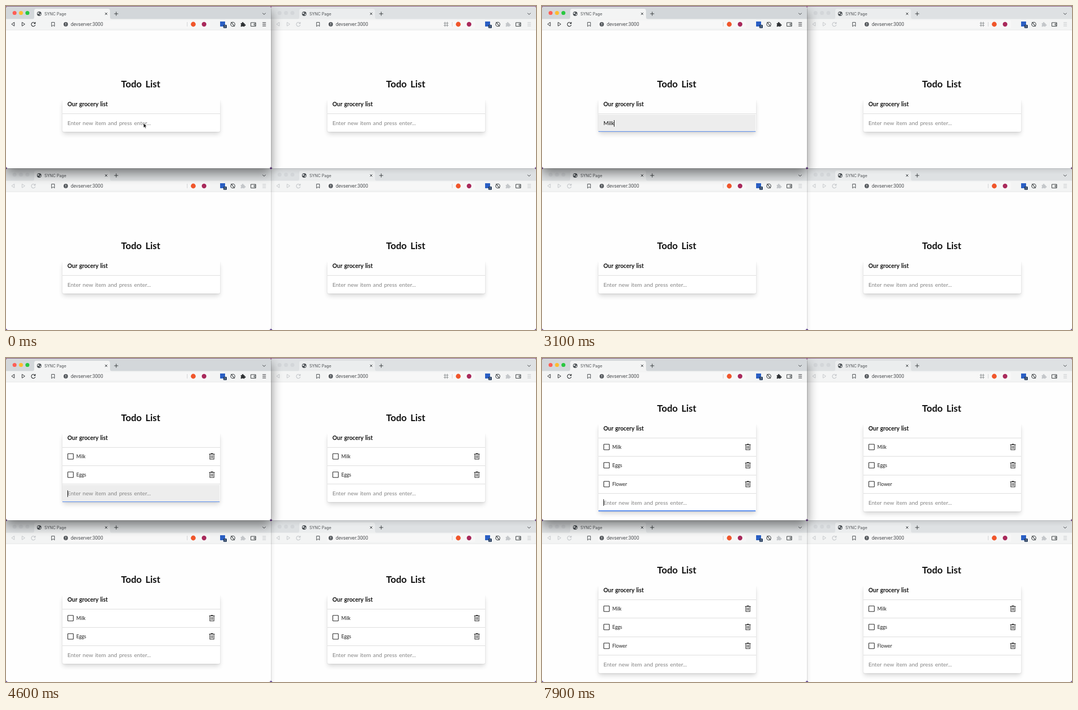
These frames come from a looping animation (958x585 px, 8000 ms). An HTML page:

```html
<!DOCTYPE html>
<html lang="en">
<head>
<meta charset="utf-8">
<title>Shared list</title>
<style>
  html, body { margin: 0; width: 100%; height: 100%; overflow: hidden; }
  body {
    position: relative;
    background: linear-gradient(#a5749f, #5b2380 50%, #43178c);
    font-family: Lato, sans-serif;
    color: #111;
  }
  .win {
    position: absolute; width: 479px; height: 292px;
    border-radius: 4px; overflow: hidden; background: #fefefe;
    box-shadow: 0 0 0 .5px rgba(0,0,0,.2), 0 3px 10px rgba(0,0,0,.12);
  }
  .win.active {
    z-index: 2;
    box-shadow: 0 0 0 .5px rgba(0,0,0,.3), 0 9px 20px rgba(0,0,0,.48);
  }
  .page { position: absolute; left: 0; top: -1px; width: 479px; height: 293px; }
  .page > svg { position: absolute; left: 0; top: 0; }
  h1 {
    position: absolute; left: 208px; top: 129px; margin: 0;
    font: 700 17px/24px Lato, sans-serif; word-spacing: 2.5px; white-space: nowrap;
  }
  .card { position: absolute; left: 102px; top: 160px; width: 285px; }
  /* the sides only become visible below the top of the heading */
  .card::before {
    content: ""; position: absolute; inset: 9px 0 0; border-radius: 3px;
    background: #fff;
    box-shadow: 0 5px 8px -1px rgba(10,10,10,.16), 0 1px 0 1px rgba(10,10,10,.03);
  }
  .head, .item, .entry { position: relative; box-sizing: border-box; padding-left: 9px; white-space: nowrap; }
  .head { height: 34px; font: 700 10.4px/34px Lato, sans-serif; word-spacing: .8px; background: #fefefe; }
  .item { height: 33.2px; padding-left: 25px; font-size: 8.8px; line-height: 32px; color: #222; }
  .item, .entry { border-top: 1px solid #dedede; }
  .item svg { position: absolute; left: 0; top: 0; }
  .entry { height: 33px; font-size: 10.2px; line-height: 33px; word-spacing: 1px; }
  .entry > * { position: relative; }
  .entry .fill { position: absolute; left: 0; right: 1px; top: 1px; bottom: 1px; background: #ededed; opacity: 0; }
  .entry .line { position: absolute; left: 0; right: 1px; bottom: 0; height: 1.5px; background: #5c8fee; opacity: 0; }
  .hint { color: #858585; }
  .caret { display: inline-block; width: 1px; height: 12px; margin-right: -1px; vertical-align: -2.5px; background: #222; visibility: hidden; }
  .pointer { position: absolute; left: 0; top: 0; z-index: 3; }
</style>
</head>
<body>
<svg class="pointer" width="479" height="292">
  <path id="arrow" d="M248.6 211.6v8.2l1.9-1.7 1.3 2.9 1.4-.6-1.3-2.8h2.6z" fill="#111" stroke="#fff" stroke-width=".6"/>
  <path id="beam" d="M246.6 208.4q1.7 0 1.9 1v6.4q-.2 1-1.9 1M250.4 208.4q-1.7 0-1.9 1v6.4q.2 1 1.9 1M247.3 213.4h2.4" fill="none" stroke="#222" stroke-width=".9"/>
</svg>
<script>
const LOOP = 8000, SHIFT = 16.6;
const GROCERIES = ['Milk', 'Eggs', 'Flower'];
const ADDED = [3300, 4500, 7800];
// [time, text in the entry field]
const TYPING = [
  [0, ''], [2400, 'M'], [2800, 'Mi'], [2900, 'Mil'], [3100, 'Milk'], [3300, ''],
  [3500, 'E'], [3900, 'Eg'], [4100, 'Egg'], [4300, 'Eggs'], [4500, ''],
  [6700, 'F'], [7200, 'Fl'], [7300, 'Flo'], [7400, 'Flow'], [7500, 'Flowe'], [7600, 'Flower'], [7800, '']
];
const CARET_OFF = [[0, 300], [1200, 2200], [5500, 6100]];

const stroke = (d, color, width = 1) =>
  `<path d="${d}" fill="none" stroke="${color}" stroke-width="${width}" stroke-linecap="round" stroke-linejoin="round"/>`;

function toolbar(active, extra) {
  const ink = '#3c4043', dim = active ? '#2e3134' : '#c4c7ca';
  const lights = active ? ['#ff5f57', '#febc2e', '#28c840'] : Array(3).fill('#d3d6d9');
  return `<svg width="479" height="44">
    <rect width="479" height="24" fill="${active ? '#d3d7da' : '#dee1e3'}"/>
    <path d="M47 24q4 0 4-4V9q0-4 4-4h129q4 0 4 4v11q0 4 4 4z" fill="${active ? '#f3f4f4' : '#ebedee'}"/>
    <rect y="23.5" width="479" height="20" fill="#f3f4f4"/>
    <rect x="101" y="26" width="268" height="14" rx="3" fill="#f7f7f7"/>
    <path d="M0 43.3h479" stroke="#e2e3e4" stroke-width=".7"/>
    ${lights.map((c, i) => `<circle cx="${15.5 + i * 11.6}" cy="12.5" r="3.6" fill="${c}"/>`).join('')}
    <circle cx="60" cy="14" r="4" fill="#4b5054"/>
    <path d="M57 12.2l2.4-.8 1 1.4-1.6 1.8-1.8-.6zM61 14.2l2.2-.4-.8 2.4-1.6.6z" fill="#e8eaeb"/>
    <text x="69.5" y="16.6" font-family="Inter, sans-serif" font-size="7.2" fill="#4a4d50">SYNC Page</text>
    ${stroke('M179.2 12.2l3.6 3.6m0-3.6l-3.6 3.6M196 14h6.4m-3.2-3.2v6.4', ink)}
    ${stroke('M464 13l2.5 2.4 2.5-2.4', ink)}
    ${stroke('M15 29.8v6.4L10.4 33zM29 29.8v6.4l4.8-3.2z', dim)}
    ${stroke('M52.2 30.8a3.6 3.6 0 1 0 .6 3.6M53 29.4v2.2h-2.4', dim, 1.1)}
    ${stroke('M82.7 29.5h5v7.2l-2.5-2-2.5 2z', ink, .9)}
    <circle cx="108" cy="33" r="3.9" fill="#54585c"/>
    <path d="M108 30.6v2.9m0 1v1" stroke="#fff"/>
    <text x="117" y="36" font-family="Roboto, sans-serif" font-size="8.6" fill="#4a4d50">devserver:3000</text>
    ${extra ? stroke('M314.5 29v8m4-8v8M312.5 31h8m-8 4h8', '#85898c', .9) : ''}
    <path d="M327.5 29v8" stroke="#d2d4d6"/>
    <circle cx="338.5" cy="33" r="4.4" fill="#f0562b"/>
    <circle cx="358" cy="33" r="4.2" fill="#a92a5c"/>
    <rect x="387" y="28" width="9" height="9" fill="#2a5fc4"/>
    <rect x="393" y="34" width="6" height="6" rx="1" fill="#1d3557"/>
    <text x="394.6" y="38.8" font-family="Roboto, sans-serif" font-size="5" fill="#fff">2</text>
    <circle cx="410" cy="33" r="3.8" fill="none" stroke="${ink}" stroke-width="1.1"/>
    ${stroke('M407 29.4l6 7.2', ink, 1.1)}
    <path d="M424.4 31h2.2a1.4 1.4 0 1 1 2.6 0h2v2.2a1.4 1.4 0 1 1 0 2.4v1.6h-2.2a1.4 1.4 0 0 0-2.4 0h-2.2v-2.2a1.3 1.3 0 0 0 0-2.2z" fill="${dim}"/>
    ${stroke('M443 30h8.4v6.6H443zM451.4 32h-3v2.6h3', ink)}
    ${stroke('M464 30h5.4m-5.4 3h5.4m-5.4 3h5.4', dim, 1.1)}
  </svg>`;
}

const itemRow = name => `<div class="item">
  <svg width="285" height="32">
    <rect x="9.7" y="10.7" width="10" height="10" rx=".8" fill="none" stroke="#2b2b2b" stroke-width="1.1"/>
    ${stroke('M265.5 11.5h9.4m-6.4 0v-1h3.4v1m-5.4 0v9.3h7.4v-9.3M269 13.9v4.6m2.4-4.6v4.6', '#333', 1.1)}
  </svg>${name}</div>`;

function addWindow(x, y) {
  const active = !x && !y;
  const win = document.createElement('div');
  win.className = active ? 'win active' : 'win';
  win.style.cssText = `left:${x}px;top:${y + 1}px`;
  win.innerHTML = `<div class="page">${toolbar(active, x && !y)}
    <h1>Todo List</h1>
    <div class="card">
      <div class="head">Our grocery list</div>
      ${GROCERIES.map(itemRow).join('')}
      <div class="entry"><div class="fill"></div><div class="line"></div><span class="typed"></span><i class="caret"></i><span class="hint">Enter new item and press enter...</span></div>
    </div></div>`;
  document.body.append(win);
  return {
    title: win.querySelector('h1'),
    card: win.querySelector('.card'),
    items: [...win.querySelectorAll('.item')]
  };
}

const windows = [[479, 292], [0, 292], [479, 0], [0, 0]].map(([x, y]) => addWindow(x, y));
const main = document.querySelector('.active');
const part = name => main.querySelector('.' + name);
const fill = part('fill'), line = part('line'), typed = part('typed'), caret = part('caret'), hint = part('hint');
const arrow = document.getElementById('arrow'), beam = document.getElementById('beam');
const clamp = v => Math.max(0, Math.min(1, v));
const show = (el, on) => { el.style.visibility = on ? 'visible' : 'hidden'; };

function render(t) {
  const count = ADDED.filter(at => t >= at).length;
  for (const { title, card, items } of windows) {
    title.style.top = 129 - SHIFT * count + 'px';
    card.style.top = 160 - SHIFT * count + 'px';
    items.forEach((el, i) => { el.style.display = i < count ? '' : 'none'; });
  }
  const text = TYPING.filter(([at]) => t >= at).pop()[1];
  typed.textContent = text;
  hint.style.display = text ? 'none' : '';
  show(caret, !CARET_OFF.some(([from, to]) => t >= from && t < to));

  const focus = clamp((t - 200) / 500);
  fill.style.opacity = focus * (1 - clamp((t - 5000) / 300));
  line.style.opacity = focus;
  show(arrow, t < 300);
  show(beam, t >= 300 && t < 2400);
}

// The picture advances in steps of 100 ms.
const start = performance.now();
function tick() {
  const t = (performance.now() - start) % LOOP;
  render(Math.floor(t / 100) * 100);
  requestAnimationFrame(tick);
}
tick();
</script>
</body>
</html>
```
